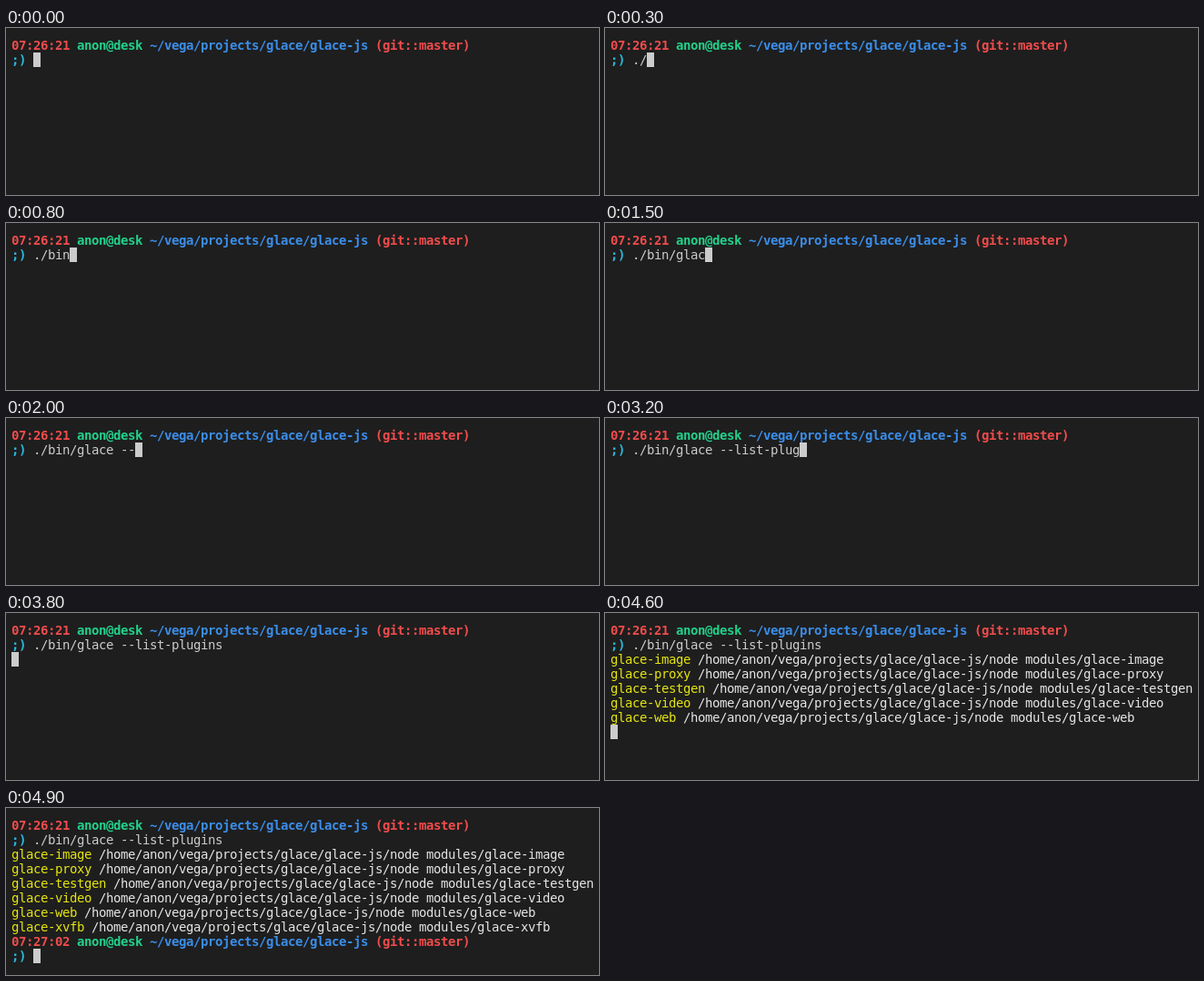
An HTML page with a canvas for the animation above (6100 ms loop, 652 by 184 pixels).

```html
<!DOCTYPE html>
<html lang="en">
<head>
<meta charset="utf-8">
<title>Terminal: listing plugins</title>
<style>
  html, body { margin: 0; width: 652px; height: 184px; overflow: hidden; background: #1e1e1e; }
  canvas { display: block; }
</style>
</head>
<body>
<canvas id="screen" width="652" height="184"></canvas>
<script>
const LOOP = 6100;
const CELL = { width: 8, height: 16, left: 6, top: 11, ascent: 13 };
const FONT = '14px "DejaVu Sans Mono", monospace';
const COLORS = {
  background: '#1e1e1e', plain: '#cccccc', white: '#e5e5e5', red: '#f14c4c',
  green: '#23d18b', blue: '#3b8eea', cyan: '#29b8db', yellow: '#e5e510'
};

const COMMAND = './bin/glace --list-plugins';
const KEY_TIMES = [
  200, 300, 500, 600, 800, 900, 1100, 1200, 1300, 1500, 1600, 1700, 1900,
  2000, 2200, 2200, 2300, 2500, 2500, 2800, 2900, 3100, 3200, 3400, 3600, 3700
];
const ENTER_TIME = 3800;
const PLUGINS = ['image', 'proxy', 'testgen', 'video', 'web', 'xvfb'];
const PLUGINS_TIME = 4600;
const LAST_PLUGIN_TIME = 4700;
const DONE_TIME = 4900;

const ctx = document.getElementById('screen').getContext('2d');
const cursor = { column: 0, row: 0 };

const cellX = column => CELL.left + column * CELL.width;
const cellY = row => CELL.top + row * CELL.height;

function newline() {
  cursor.column = 0;
  cursor.row++;
}

// Every character sits on the terminal grid.
function print(text, color, bold = false) {
  ctx.font = (bold ? 'bold ' : '') + FONT;
  ctx.fillStyle = COLORS[color];
  for (const char of text) {
    ctx.fillText(char, cellX(cursor.column), cellY(cursor.row) + CELL.ascent);
    cursor.column++;
  }
}

function printPrompt(clock) {
  print(clock + ' ', 'red', true);
  print('anon@desk ', 'green', true);
  print('~/vega/projects/glace/glace-js ', 'blue', true);
  print('(git::master)', 'red', true);
  newline();
  print(';) ', 'cyan', true);
}

function printPlugin(plugin) {
  const name = 'glace-' + plugin;
  print(name + ' ', 'yellow');
  print('/home/anon/vega/projects/glace/glace-js/node modules/' + name, 'white');
  newline();
}

function draw(time) {
  ctx.fillStyle = COLORS.background;
  ctx.fillRect(0, 0, 652, 184);
  cursor.column = cursor.row = 0;

  printPrompt('07:26:21');
  const typed = KEY_TIMES.filter(keyTime => keyTime <= time).length;
  print(COMMAND.slice(0, typed), 'plain');
  if (time >= ENTER_TIME) newline();
  if (time >= PLUGINS_TIME) {
    PLUGINS.slice(0, time < LAST_PLUGIN_TIME ? -1 : undefined).forEach(printPlugin);
  }
  if (time >= DONE_TIME) printPrompt('07:27:02');

  ctx.fillStyle = COLORS.plain;
  ctx.fillRect(cellX(cursor.column), cellY(cursor.row), CELL.width, CELL.height);
}

const start = performance.now();
function tick() {
  draw((performance.now() - start) % LOOP);
  requestAnimationFrame(tick);
}
tick();
</script>
</body>
</html>
```
